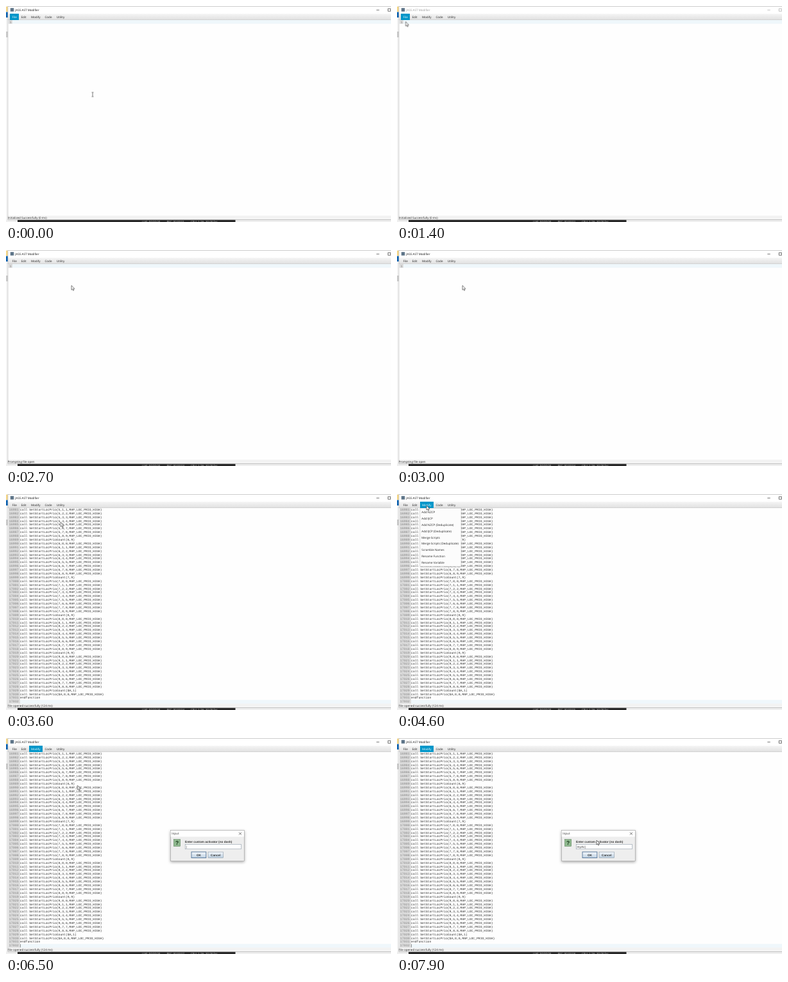
These frames come from a looping animation (600 by 338 pixels, 8000 ms). An HTML page:

```html
<!DOCTYPE html>
<html lang="en">
<head>
<meta charset="utf-8">
<title>Script editor</title>
<style>
  html, body { margin: 0; width: 100%; height: 100%; overflow: hidden; background: #fff; }
  svg { display: block; width: 600px; height: 338px; }
  text { font: 4.55px "Open Sans", "Noto Sans", sans-serif; fill: #222; white-space: pre; text-rendering: geometricPrecision; }
  .file text, .menu text { font-size: 4.5px; }
  .code text { font: 4.74px "Liberation Mono", monospace; fill: #2c2c2c; }
  .code .num { font-size: 5px; fill: #808080; }
  .obs text { font-size: 4.4px; fill: #ccc; }
  .swing text { font: bold 4.7px "Liberation Sans", sans-serif; fill: #333; }
  .swing .typed { font-weight: normal; font-size: 4.8px; }
  .timed { animation: 8s step-end infinite; }
  .line { fill: none; stroke: #555; stroke-width: .6; }
  #cursor { animation: move 8s ease-in-out infinite; }
  @keyframes move {
    0% { transform: translate(135px, 138.5px); }
    2% { transform: translate(135px, 138.5px); }
    10.5% { transform: translate(13px, 17px); }
    13.5%, 18.75% { transform: translate(13.5px, 24.5px); }
    26.25%, 27.5% { transform: translate(71.5px, 58px); }
    30%, 39.5% { transform: translate(102px, 55.5px); }
    54%, 57.6% { transform: translate(46px, 18px); }
    61.5% { transform: translate(48px, 30px); }
    65% { transform: translate(53px, 39px); }
    71.5%, 78% { transform: translate(61px, 52.5px); }
    88.5%, 100% { transform: translate(311px, 160px); }
  }
</style>
</head>
<body>
<svg id="stage" viewBox="0 0 600 338" xmlns="http://www.w3.org/2000/svg"></svg>
<script>
const LOOP = 8000;
const rules = new Map();

const rect = (x, y, w, h, fill, more = '') =>
  `<rect x="${x}" y="${y}" width="${w}" height="${h}" fill="${fill}" ${more}/>`;
const box = (x, y, w, h, fill, stroke, width = .5) =>
  rect(x, y, w, h, fill, `stroke="${stroke}" stroke-width="${width}"`);
const text = (x, y, str, more = '') => `<text x="${x}" y="${y}" ${more}>${str}</text>`;
const ink = color => `style="fill:${color}"`;
const line = (d, color = '#555') => `<path class="line" d="${d}" style="stroke:${color}"/>`;
const chevron = (x, y, color = '#666') => line(`M${x - 1.4} ${y - .7}l1.4 1.4l1.4-1.4`, color);
const cross = (x, y) => line(`M${x - 2} ${y - 2}l4 4m0-4l-4 4`, '#222');
const group = (cls, body) => `<g class="${cls}">${body}</g>`;

// Shows the content only between two times of the loop.
function during(from, to, body) {
  const name = `on-${from}-${to}`;
  const at = ms => `${ms / LOOP * 100}%`;
  rules.set(name, `@keyframes ${name} {
    0% { visibility: hidden } ${at(from)} { visibility: visible } ${at(to)} { visibility: hidden } }`);
  return `<g class="timed" style="animation-name:${name}">${body}</g>`;
}

function backdrop() {
  const seconds = Array.from({ length: 8 }, (_, i) =>
    during(i * 1000, (i + 1) * 1000, text(275.6, 339.4, i + 1))).join('');
  return rect(0, 0, 600, 338, '#f4f4f4') +
    rect(0, 1, 3, 8, '#f5d88c') + rect(0, 9.5, 3, 8.5, '#1467b3') +
    rect(0, 40, 3, 9, '#ccc') + rect(0, 334, 600, 4, '#efefef') +
    rect(18, 334.6, 339.5, 3.4, '#292929') +
    group('obs', text(212, 339.4, 'LIVE: 00:00:00') +
      text(275.6, 339.4, 'REC: 00:00:0', 'text-anchor="end"') + seconds +
      text(288, 339.4, 'CPU: 2.2%, 30.00 fps'));
}

function titleBar() {
  const bar = color => text(14.3, 7.9, 'JASS AST Modifier', ink(color)) +
    line('M577.3 6.3h4.4M595.3 4.2h4v4h-4z', color);
  return rect(3, 0, 597, 12.5, '#fff') + rect(3, 0, 597, .6, '#aaa') +
    rect(6.8, 3.2, 5.4, 5.4, '#5d7488') +
    during(0, 1380, bar('#111')) + during(1380, 2600, bar('#999')) + during(2600, LOOP, bar('#111'));
}

function menuBar() {
  const names = [['File', 9.5], ['Edit', 23.5], ['Modify', 39], ['Code', 60.5], ['Utility', 79]];
  const active = (x, w, i) => rect(x, 12, w, 10, '#0096c9') + text(names[i][1], 18.9, names[i][0], ink('#fff'));
  return rect(3, 12.4, 597, 9.6, 'url(#bar)') + rect(3, 21.6, 597, .5, '#bcbcbc') +
    names.map(([name, x]) => text(x, 18.9, name)).join('') +
    during(0, 1500, active(6, 14, 0)) + during(4400, LOOP, active(36, 21, 2));
}

function listing() {
  const lines = [];
  const prio = (p, i) => lines.push(`call SetStartLocPrio(${p},${i},${i < p ? i : i + 1},MAP_LOC_PRIO_HIGH)`);
  const count = (p, n) => lines.push(`call SetStartLocPrioCount(${p},${n})`);
  for (let p = 5; p <= 9; p++) {
    if (p > 5) count(p, 9);
    for (let i = p > 5 ? 0 : 1; i < 9; i++) prio(p, i);
  }
  count('$A', 1);
  lines.push('call SetStartLocPrio($A,0,0,MAP_LOC_PRIO_HIGH)', 'endfunction', '');
  return lines.map((code, i) => {
    const y = (25.9 + i * 5.89).toFixed(2);
    return text(4.8, y, 16981 + i, 'class="num"') + text(22.1, y, code);
  }).join('');
}

function editor() {
  const empty = rect(3.5, 22, 596.5, 5.8, '#eff7fb') + rect(4, 22, 6, 5.8, '#ddd') +
    text(5.4, 26.5, '1', 'class="num"');
  const full = rect(22, 322.2, 578, 5.8, '#eff7fb') + rect(4, 22, 18, 306, '#ddd') + listing();
  return rect(3, 22, 597, 306, '#fefefe') +
    group('code', during(0, 3100, empty) + during(3100, LOOP, full) +
      during(6300, LOOP, rect(22.3, 322.6, .5, 5, '#333')));
}

function statusBar() {
  const say = str => text(2.6, 332.9, str);
  return rect(3, 328, 597, 6, '#f3f3f3') +
    during(0, 1500, say('Initialized Successfully (0 ms)')) +
    during(1500, 3100, say('Prompting file open')) +
    during(3100, LOOP, say('File opened successfully (124 ms)')) +
    rect(2.7, 0, .5, 334.5, '#aaa') + rect(2.7, 334, 597.3, .6, '#a0a0a0');
}

function modifyMenu() {
  const items = ['Add NZCP', 'Add IJCP', 'Add NZCP (Deduplicate)', 'Add IJCP (Deduplicate)', 'Merge Scripts',
    'Merge Scripts (Deduplicate)', 'Scramble Names', 'Rename Function', 'Rename Variable'];
  const label = (i, more) => text(38.3, 30.3 + i * 9.8, items[i], more);
  const hover = (i, from, to) => during(from, to,
    rect(36, 23.6 + i * 9.8, 64, 9.8, '#0096c9') + label(i, ink('#fff')));
  return group('menu', during(4500, 6000,
    `<g filter="url(#soft)">${box(36, 22.3, 64, 90.8, '#fcfcfc', '#c4c4c4', .4)}</g>` +
    items.map((_, i) => label(i)).join('')) +
    hover(0, 4760, 5000) + hover(1, 5000, 5300) + hover(2, 5300, 5650) + hover(3, 5650, 6000));
}

function tree() {
  const kids = [['3D Objects', '#31a8c9'], ['Desktop', '#1d8fdc'], ['Documents', '#7f98ab'], ['Downloads', '#2389d7'],
    ['Music', '#2b8fe0'], ['Pictures', '#4ba6b8'], ['Videos', '#4c5560'], ['Velmora (C:)', '#8b959c'], ['New Volume (D:)', '#4a4a4a']];
  const rows = kids.map(([name, color], i) => {
    const y = 67.9 + i * 9.45;
    const drive = i > 6;
    return line(`M10.4 ${y - 1.3}l1.3 1.3l-1.3 1.3`, '#888') +
      rect(15.6, drive ? y - 1 : y - 2.4, 6, drive ? 2.4 : 4.8, color) + text(23.8, y + 1.7, name);
  }).join('');
  return `<g clip-path="url(#tree)">` + rect(3, 72.6, 55, 9.4, '#d9d9d9') +
    line('M6.3 44.7l1.3 1.3l-1.3 1.3', '#888') + `<circle cx="15.5" cy="46" r="2.6" fill="#0f78d4"/>` +
    text(20.8, 47.7, 'TarnKeep') + chevron(7, 58.4) + rect(12.2, 56, 6.4, 4.2, '#2f9bd8') +
    text(20.8, 60.1, 'This PC') + rows +
    line('M6.3 153.7l1.3 1.3l-1.3 1.3', '#888') + rect(12.2, 153, 6.4, 4, '#2f9bd8') + text(20.8, 157, 'Network') + '</g>' +
    rect(58, 38, 6, 117.5, '#f0f0f0') + rect(58, 75, 6, 68, '#cdcdcd') +
    line('M59.6 42.6l1.4-1.4l1.4 1.4', '#444') + chevron(61, 152, '#444');
}

function addressRow() {
  const grey = '#777';
  const path = [['«', 55], ['Desktop', 60.4], ['›', 80.6], ['ReleasePackage1.0.0', 86], ['›', 132.4],
    ['tempFiles', 137.2], ['›', 161], ['scripts', 166]];
  return line('M12.5 18.5h-4.6m1.8-1.8l-1.8 1.8l1.8 1.8M22.6 18.5h4.6m-1.8-1.8l1.8 1.8l-1.8 1.8', '#c4c4c4') +
    chevron(32.5, 18.5, '#aaa') + line('M39.3 21v-4.8m-1.9 1.9l1.9-1.9l1.9 1.9', '#333') +
    box(44.8, 14, 177, 10, '#fff', '#d4d4d4') + rect(46.5, 16.2, 6, 5, '#f4ce69') +
    path.map(([s, x]) => text(x, 20.3, s)).join('') + chevron(210, 19) +
    rect(213.6, 14, .4, 10, '#ddd') + line('M219.5 17.9a2.1 2.1 0 1 0 .3 1.8m-.1-3v1.6h-1.6', grey) +
    box(226.5, 14, 80.5, 10, '#fff', '#d4d4d4') + text(230, 20.3, 'Search scripts', ink('#777')) +
    line('M299 21l1.5-1.5M300.2 18a1.5 1.5 0 1 1 3 0a1.5 1.5 0 1 1-3 0', grey);
}

function fileList() {
  const head = [['Name', 72.5], ['Date modified', 175], ['Type', 231.5], ['Size', 278.5]];
  const grey = ink('#6d6d6d');
  return head.map(([s, x]) => text(x, 44.9, s, ink('#4c607a'))).join('') +
    [173, 229, 276, 305].map(x => rect(x, 39, .4, 9.5, '#ddd')).join('') + line('M119.8 39.3l1.4-1.2l1.4 1.2', '#999') +
    during(1980, 2600, rect(70, 50, 234.5, 9.3, '#e5f3fd')) +
    box(74, 51.7, 4.6, 5.8, '#e8f2f5', '#6d94a6', .4) + line('M75 53.5h2.6M75 55h2.6', '#4e9dbb') +
    text(80.8, 56.3, 'war3map.j') + text(175, 56.3, '5/8/2020 8:27 PM', grey) +
    text(231.8, 56.3, 'J File', grey) + text(304, 56.3, '802 KB', `text-anchor="end" ${grey}`) +
    rect(66, 149, 244.5, 6.4, '#f0f0f0') + rect(73, 149.3, 230.5, 5.8, '#cdcdcd') +
    line('M69.6 150.8l-1.4 1.4l1.4 1.4M306.6 150.8l1.4 1.4l-1.4 1.4', '#444');
}

function openDialog() {
  const blue = ink('#1e395b');
  const button = (x, name, stroke, width) => box(x, 171, 33.6, 9.2, '#e1e1e1', stroke, width) +
    text(x + 16.8, 177.2, name, 'text-anchor="middle"');
  return during(1500, 2600, group('file',
    `<g filter="url(#shadow)">${box(0, 0, 310.8, 185.5, '#fff', '#8a8a8a')}</g>` +
    text(6.3, 7.8, 'Open') + cross(304.7, 6) + addressRow() +
    rect(.3, 26.5, 310.2, 11, '#f5f6f7') + rect(.3, 37.3, 310.2, .4, '#e2e2e2') +
    text(9.6, 33.5, 'Organize', blue) + `<path d="M30.4 31.2h3.2l-1.6 1.8z" fill="#444"/>` + text(45.8, 33.5, 'New folder', blue) +
    [0, 2, 4].map(dy => rect(263, 29.5 + dy, 1.3, 1.2, '#5689b5') + rect(265, 29.8 + dy, 4.3, .6, '#999')).join('') +
    `<path d="M272.3 31.2h3.2l-1.6 1.8z" fill="#444"/>` +
    box(284.3, 29.5, 6, 4.8, '#fff', '#1876b8') + rect(287.2, 29.5, 3.1, 4.8, '#2a8dd2') +
    `<circle cx="301.5" cy="31.8" r="3.4" fill="#0a66c2"/>` + text(301.5, 33.5, '?', 'text-anchor="middle" style="fill:#fff;font-weight:bold"') +
    tree() + fileList() +
    rect(.3, 155.6, 310.2, 29.6, '#f0f0f0') + text(75.4, 165.2, 'File name:', 'text-anchor="end"') +
    box(77.3, 159, 148, 9.2, '#fff', '#0078d7', .7) + rect(79, 161, .5, 5.4, '#111') + chevron(221.8, 163.7) +
    box(230.3, 159, 73.4, 9.2, '#e3e3e3', '#adadad') + text(233, 165.2, 'Any files (*.*)') + chevron(300, 163.7) +
    button(230.5, 'Open', '#0078d7', 1) + button(269.5, 'Cancel', '#adadad', .5) +
    line('M307 184l2.5-2.5M308.5 184l1-1', '#aaa')));
}

function inputDialog() {
  const typing = [['', 6300], ['m', 7180], ['my', 7480], ['myA', 7680], ['myAc', 7880]];
  const typed = typing.map(([s, from], i) =>
    during(from, i < 4 ? typing[i + 1][1] : LOOP, text(280.6, 171.9, s + '|', 'class="typed"'))).join('');
  const button = (x, w, name, stroke, width) => box(x, 178.2, w, 9.3, 'url(#metal)', stroke, width) +
    text(x + w / 2, 184.6, name, 'text-anchor="middle"');
  return during(6300, LOOP, group('swing',
    `<g filter="url(#shadow)">${box(256.4, 144.6, 114.8, 48, '#eee', '#888')}</g>` +
    rect(256.7, 144.9, 114.2, 9.6, '#fff') +
    text(258.2, 151.4, 'Input', 'style="font:4.6px \'Open Sans\',sans-serif"') + cross(365, 149.6) +
    box(261.3, 158.6, 10.4, 10.8, '#8fb98f', '#557a55') +
    text(266.5, 167.1, '?', 'text-anchor="middle" style="font-size:8.5px;fill:#173517"') +
    text(279, 163.7, 'Enter custom activator (no dash)') +
    box(279.2, 166.4, 87.2, 7.4, '#fff', '#7a8a99') + typed +
    button(289, 22.8, 'OK', '#5e7d9e', 1) + button(315, 23.6, 'Cancel', '#7a8a99', .5)));
}

function cursor() {
  const arrow = `<path d="M0 0V7L1.6 5.6L2.7 8L3.8 7.5L2.8 5.2H4.9Z" fill="#fff" stroke="#111" stroke-width=".55"/>`;
  const beam = line('M-1.5-3.3h1.2l.3.3l.3-.3h1.2M0-3v6M-1.5 3.3h1.2l.3-.3l.3.3h1.2', '#222');
  return `<g id="cursor">${during(0, 780, beam)}${during(780, LOOP, arrow)}</g>`;
}

const stops = (id, a, b) => `<linearGradient id="${id}" x2="0" y2="1">
  <stop stop-color="${a}"/><stop offset="1" stop-color="${b}"/></linearGradient>`;
const defs = `<defs>${stops('bar', '#f4f4f4', '#e0e0e0')}${stops('metal', '#f6f9fc', '#bdd0e2')}
  <filter id="shadow"><feDropShadow dx="0" dy="1.5" stdDeviation="2" flood-opacity=".35"/></filter>
  <filter id="soft"><feDropShadow dx="0" dy=".8" stdDeviation="1.2" flood-opacity=".25"/></filter>
  <clipPath id="tree"><rect x="2" y="38" width="55.5" height="117.6"/></clipPath></defs>`;

const scene = [backdrop, titleBar, menuBar, editor, statusBar, modifyMenu, openDialog, inputDialog, cursor];
const markup = defs + scene.map(draw => draw()).join('');
const sheet = document.createElement('style');
sheet.textContent = [...rules.values()].join('\n');
document.head.append(sheet);
document.getElementById('stage').innerHTML = markup;
</script>
</body>
</html>
```
